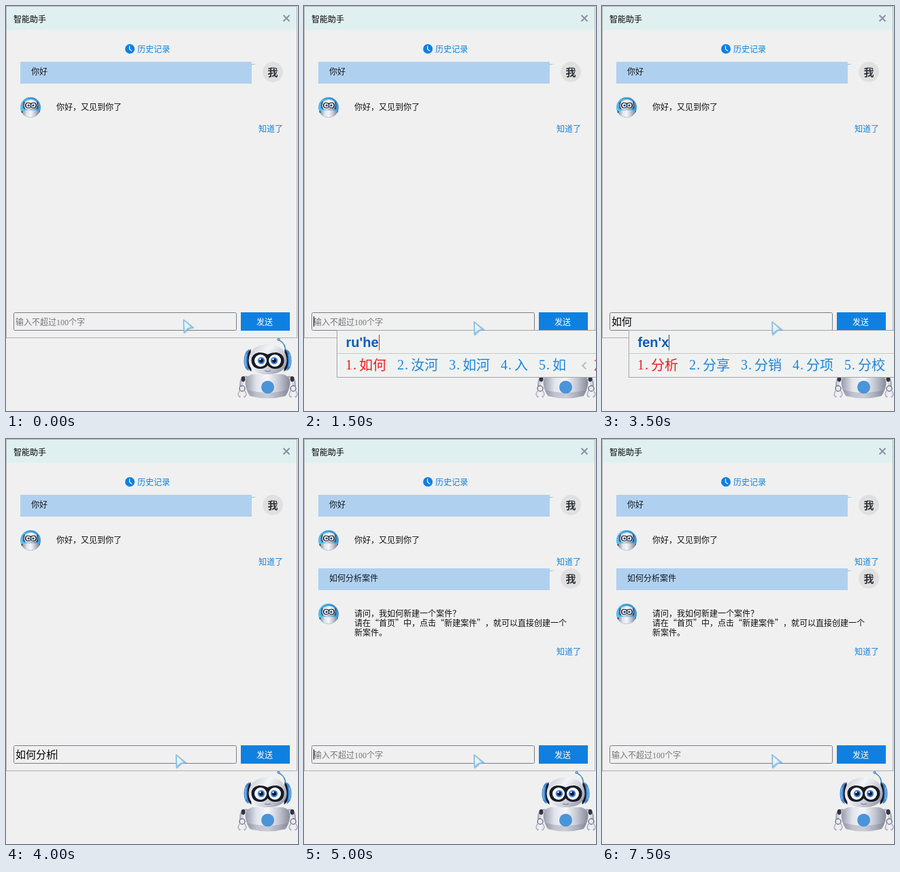
Write an HTML page with a canvas that moves like this. It is 429 by 595 pixels and loops after 8000 ms.

```html
<!DOCTYPE html>
<html lang="zh-CN">
<head>
<meta charset="utf-8">
<title>智能助手</title>
<style>
html, body { margin: 0; width: 100%; height: 100%; overflow: hidden; background: #f0f0f0; }
canvas { display: block; }
</style>
</head>
<body>
<canvas id="stage"></canvas>
<script>
const W = 429, H = 595, LOOP = 8000;
const CJK = '"Noto Sans CJK SC", "Noto Sans CJK", sans-serif';
const SERIF = '"Liberation Serif", serif';
const LATIN = '"Liberation Sans", Arial, sans-serif';
const BLUE = '#1080e0';

const canvas = document.getElementById('stage');
const ctx = canvas.getContext('2d');
const ratio = window.devicePixelRatio || 1;
canvas.width = W * ratio;
canvas.height = H * ratio;
canvas.style.width = W + 'px';
canvas.style.height = H + 'px';

function rect(x, y, w, h, color) {
  ctx.fillStyle = color;
  ctx.fillRect(x, y, w, h);
}

function text(str, x, y, size, color, family = CJK, weight = 400) {
  ctx.font = `${weight} ${size}px ${family}`;
  ctx.fillStyle = color;
  ctx.fillText(str, x, y);
  return ctx.measureText(str).width;
}

function oval(x, y, rx, ry, fill, stroke, width = 1) {
  ctx.beginPath();
  ctx.ellipse(x, y, rx, ry, 0, 0, Math.PI * 2);
  if (fill) { ctx.fillStyle = fill; ctx.fill(); }
  if (stroke) { ctx.strokeStyle = stroke; ctx.lineWidth = width; ctx.stroke(); }
}

function path(d, fill, stroke, width = 1) {
  const p = new Path2D(d);
  if (fill) { ctx.fillStyle = fill; ctx.fill(p); }
  if (stroke) { ctx.strokeStyle = stroke; ctx.lineWidth = width; ctx.stroke(p); }
}

function gradient(x0, y0, x1, y1, ...colors) {
  const g = ctx.createLinearGradient(x0, y0, x1, y1);
  colors.forEach((c, i) => g.addColorStop(i / (colors.length - 1), c));
  return g;
}

// Robot centred on x = 0, eye line at y = 0
function robot(x, y, scale, badge) {
  ctx.save();
  ctx.translate(x, y);
  ctx.scale(scale, scale);
  ctx.lineCap = 'round';

  path('M26 -12 Q27 -25 17 -30', null, '#4a8fc8', 1.6);
  oval(16, -31, 1.7, 1.7, '#8cc0ea', '#3a86c8', 1);

  for (const side of [-1, 1]) {
    ctx.save();
    ctx.scale(side, 1);
    path('M31 25 Q39 25 39 36 L38 43', null, '#a8acbc', 5);
    path('M32 26 Q38 27 38 35', null, '#e4e6ee', 2);
    oval(36, 27, 3, 4, '#30343f');
    oval(37.5, 41, 4, 4, '#e8eaf2', '#5a5e6c', 1.2);
    path('M35 44 Q30 49 34 53 M40 44 Q45 49 41 53', null, '#9a9cba', 2.4);
    path('M35 45 Q31 49 34 52 M40 45 Q44 49 41 52', null, '#f2f2fa', 1.1);
    ctx.restore();
  }

  path('M-22 20 Q-33 22 -33 34 Q-31 46 -26 52 Q0 59 26 52 Q31 46 33 34 Q33 22 22 20 Z',
    gradient(-33, 0, 33, 0, '#9699a8', '#e2e4ec', '#f5f6fa', '#c4c7d3', '#858998'));
  path('M-30 43 Q0 51 30 43 L26 52 Q0 59 -26 52 Z', 'rgba(110,114,132,.3)');

  for (const side of [-1, 1]) {
    ctx.save();
    ctx.scale(side, 1);
    path('M27 -17 Q35 -13 35 0 Q35 12 28 15 Z', '#4389cf');
    path('M25 -17 Q30 -13 30 0 Q30 13 24 16 Z', '#171c2a');
    path('M32 -9 Q34 0 32 8', null, '#7fb8ea', 1.5);
    ctx.restore();
  }

  path('M0 -24 Q27 -23 28 0 Q27 20 0 20 Q-27 20 -28 0 Q-27 -23 0 -24 Z',
    gradient(-25, -20, 22, 21, '#c9ccd8', '#f4f5f8', '#c9ccd6', '#8e92a2'));
  path('M-13 -12 Q-5 -12 0 -9 Q5 -12 13 -12 Q24 -10 24 0 Q23 12 11 12 Q4 12 0 7 Q-4 12 -11 12 Q-23 12 -24 0 Q-24 -10 -13 -12 Z',
    '#171b25');
  for (const side of [-1, 1]) {
    const ex = side * 10.5;
    oval(ex, 0, 9, 9, '#f6f9fc');
    oval(ex - side, 0, 5.2, 5.2, '#3c7ed0');
    oval(ex - side, 0, 3, 3, '#0d1730');
    oval(ex - side - 1.5, -2, 1.2, 1.2, '#fff');
  }
  path('M-4 15 Q0 17 4 15', null, '#696d7d', 1);

  if (badge) oval(0, 39, 9.5, 9.5, '#4a94d8');
  ctx.restore();
}

function userLine(y, str) {
  rect(21, y, 340, 32, '#b0d0f0');
  path(`M361 ${y + 3} h7 l-7 2 Z`, '#a4cbef');
  path(`M361 ${y + 5.5} h4`, null, '#fafafa', 1);
  text(str, 37, y + 19, 12, '#101820');
  oval(392, y + 15, 15, 15, '#e0e0e0');
  text('我', 384.5, y + 20.5, 15, '#303438', CJK, 700);
}

function botLine(y, lines, linkY) {
  ctx.save();
  ctx.beginPath();
  ctx.arc(36, y + 1, 15, 0, Math.PI * 2);
  ctx.clip();
  rect(20, y - 15, 32, 32, gradient(21, y + 10, 50, y - 10, '#5cc8f0', '#48b0e4', '#2f86cc'));
  robot(36.5, y - 2, 0.36, false);
  ctx.restore();
  lines.forEach((s, i) => text(s, 74, y + 5 + i * 14, 12, '#101010'));
  text('知道了', 371, linkY + 5, 12, BLUE);
}

function pointer(x, y) {
  ctx.save();
  ctx.translate(x, y);
  ctx.lineJoin = 'round';
  path('M1.5 1.5 L16 13 L9.5 14 L2 21 Z', 'rgba(90,130,170,.25)', 'rgba(90,130,170,.22)', 2);
  path('M1 1 L15 12.5 L8.5 13.5 L1.5 19.5 Z', gradient(0, 2, 13, 16, '#eaf6fe', '#c8e4f7', '#8cc0e8'), '#86bbe4', 1.6);
  path('M2.5 4.5 L11.5 12 L7 12.8 L2.8 16.5 Z', gradient(2, 5, 9, 15, '#ffffff', '#d2eafa'));
  ctx.restore();
}

function frameBox(x, y, w, h, stroke) {
  ctx.strokeStyle = stroke;
  ctx.lineWidth = 1;
  ctx.strokeRect(x + .5, y + .5, w, h);
}

function candidates({ x, typed, words, caret, pager }) {
  rect(x, 476, W, 70, '#f0f2f2');
  frameBox(x, 476, W, 69, '#a4a4a8');
  rect(x + 1, 510, W, 1, '#c8caca');
  const left = x + 13.5;
  const w = text(typed, left, 501, 20, '#0a5cbc', LATIN, 700);
  rect(Math.round(left + w), 483, 1, 23, caret);

  let cx = left - .5;
  words.forEach((word, i) => {
    const color = i ? '#1c86dc' : '#f01c1c';
    text(i + 1, cx, 534, 20, color, SERIF);
    text('.', cx + 11, 534, 20, color, SERIF);
    text(word, cx + 20, 534.5, 20, color, CJK, 300);
    cx += 36 + word.length * 20;
  });
  if (pager) {
    path('M414.5 523.5 L409 528.5 L414.5 533.5', null, '#b8b8bc', 1.8);
    path('M427 522 Q428 520 431 520 M427 535 L431 530 M427 535 H431', null, '#f05050', 1.5);
  }
}

const popups = [
  { at: 1500, x: 48, typed: "ru'he", words: ['如何', '汝河', '如河', '入', '如'], caret: '#f01c1c', pager: true },
  { at: 3500, x: 39, typed: "fen'x", words: ['分析', '分享', '分销', '分项', '分校'], caret: '#404858' },
  { at: 4500, x: 69, typed: "an'jian", words: ['案件', '安检', '按键', '安监', '按件'], caret: '#f01c1c' }
];
const caretOn = [500, 1500, 2500, 4000, 5000, 6000, 7000];

function draw(time) {
  const step = Math.floor(time / 500) * 500;
  const sent = step >= 5000;
  const value = sent || step < 2000 ? '' : step < 4000 ? '如何' : '如何分析';

  ctx.setTransform(ratio, 0, 0, ratio, 0, 0);
  rect(0, 0, W, H, '#f0f0f0');
  rect(0, 0, 428, 35, '#e0f0f0');
  frameBox(0, 0, 427, 487, '#b0b0b4');
  text('智能助手', 11, 24, 12, '#000');
  path('M407.5 13.5 L416.5 22.5 M416.5 13.5 L407.5 22.5', null, '#8c90a4', 2);

  oval(182, 63, 7, 7, BLUE);
  path('M181.5 58.5 V63.5 L185 66', null, '#fff', 1.2);
  text('历史记录', 193, 68, 12, BLUE);

  userLine(82, '你好');
  botLine(148, ['你好，又见到你了'], 180);
  if (sent) {
    userLine(190, '如何分析案件');
    botLine(256, [
      '请问，我如何新建一个案件？',
      '请在“首页”中，点击“新建案件”，就可以直接创建一个',
      '新案件。'
    ], 312);
  }

  ctx.beginPath();
  ctx.roundRect(11.5, 450.5, 327, 26, 2);
  ctx.fillStyle = '#f0f0f0';
  ctx.fill();
  ctx.strokeStyle = '#7c7c8c';
  ctx.lineWidth = 1;
  ctx.stroke();
  if (value) {
    text(value, 14, 469, 15, '#000');
  } else {
    text('输入不超过', 14, 469, 12, '#757575');
    text('100', 74, 469, 12, '#757575', SERIF);
    text('个字', 92, 469, 12, '#757575');
  }
  if (caretOn.includes(step)) rect(14 + value.length * 15, 456, 1, 15, '#000');

  rect(345, 450, 72, 27, BLUE);
  text('发送', 368, 469, 12, '#fff');

  robot(384.5, 521, 1, true);

  const popup = popups.find(p => p.at === step);
  if (popup) candidates(popup);
  if (step < 500) pointer(260, 460);
  else pointer(249, 463);
}

function tick(now) {
  draw(now % LOOP);
  requestAnimationFrame(tick);
}
draw(0);
requestAnimationFrame(tick);
</script>
</body>
</html>
```
